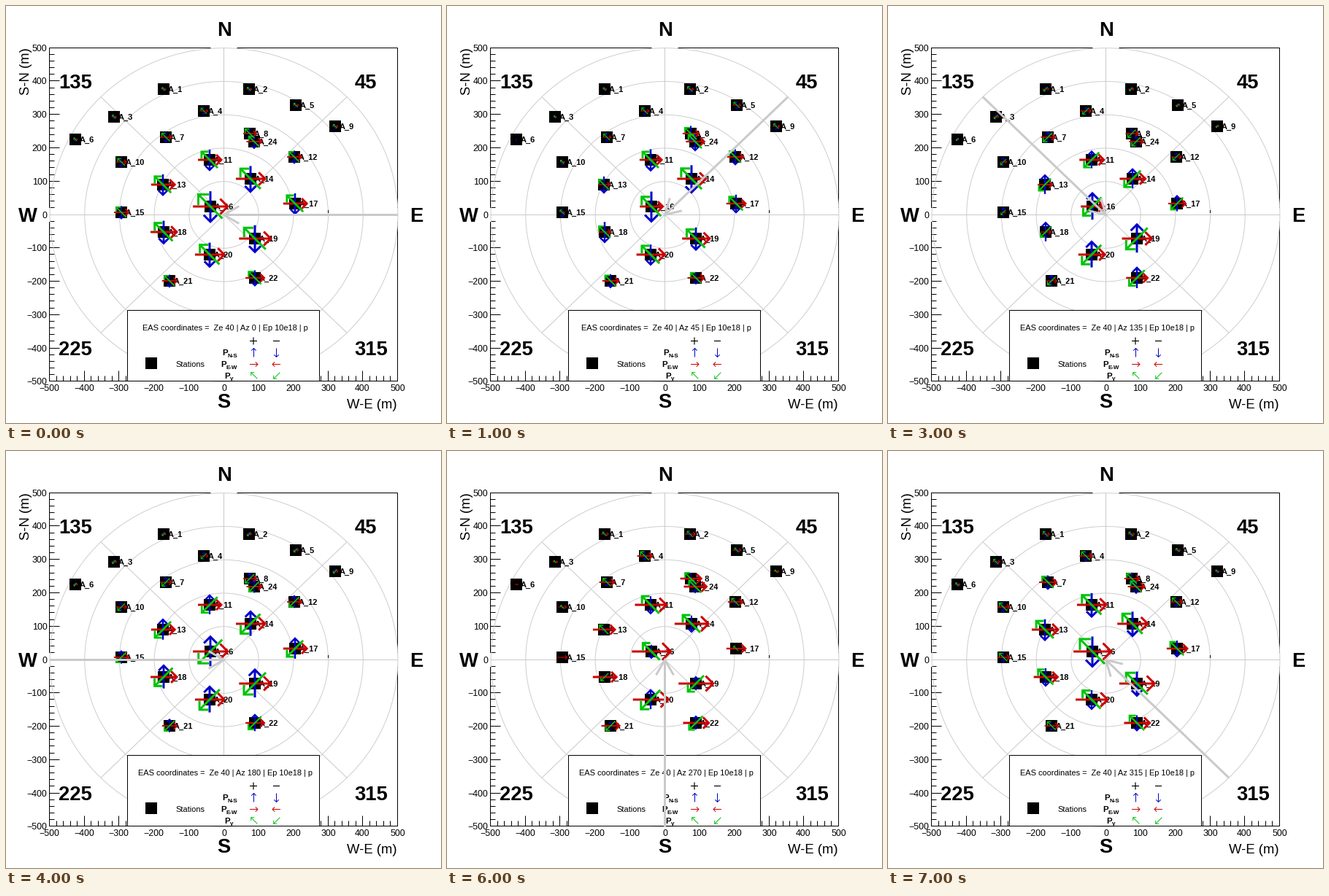
Recreate the animation shown at these times as a matplotlib script. Size 596x572 px, loop 8 s.

```python
import numpy as np
import matplotlib.pyplot as plt
from matplotlib.animation import FuncAnimation
from matplotlib.patches import Ellipse, Rectangle

W, H, DPI = 596, 572, 100
PX = 72 / DPI                      # points per pixel
LEFT, RIGHT, TOP, BOTTOM = 59.5, 536.5, 57.5, 514.5
CX, CY = 298.5, 286.5              # shower core
RX, RY = 238.4, 228.8              # 500 m in pixels
ZENITH = 40
GREY, RED, BLUE, GREEN = "#cacaca", "#cc0000", "#0000cc", "#00c40a"

plt.rcParams["font.family"] = "Liberation Sans"

STATIONS = {
    1: (216, 114), 2: (333, 114), 3: (148, 152), 4: (271, 144),
    5: (397, 136), 6: (95, 183), 7: (219, 180), 8: (334, 175),
    9: (451, 165), 10: (158, 214), 11: (279, 211), 12: (395, 207),
    13: (215, 245), 14: (335, 237), 15: (158, 283), 16: (280, 275),
    17: (396, 271), 18: (216, 310), 19: (341, 319), 20: (279, 341),
    21: (224, 377), 22: (341, 373), 24: (340, 186),
}

fig = plt.figure(figsize=(W / DPI, H / DPI), dpi=DPI, facecolor="white")
ax = fig.add_axes([0, 0, 1, 1])
ax.set_xlim(0, W)
ax.set_ylim(H, 0)
ax.axis("off")


def line(xs, ys, color="black", width=1.0, z=1):
    return ax.plot(xs, ys, color=color, lw=width * PX, zorder=z, snap=False,
                   solid_capstyle="butt", solid_joinstyle="miter")[0]


def text(x, y, s, size, ha="center", bold=False, z=5):
    """Place text with its capitals centred on y."""
    return ax.text(x, y + .36 * size, s, fontsize=size * PX, ha=ha,
                   va="baseline", zorder=z,
                   fontweight="bold" if bold else "normal")


def arrow(tail, tip, head, color, width, z, half_angle=45):
    """Open arrow: a shaft and two wings of the given length."""
    (x0, y0), (x1, y1) = tail, tip
    back = np.arctan2(y0 - y1, x0 - x1)
    a = back + np.radians([-half_angle, half_angle])
    wx, wy = x1 + head * np.cos(a), y1 + head * np.sin(a)
    return [line([x0, x1], [y0, y1], color, width, z),
            line([wx[0], x1, wx[1]], [wy[0], y1, wy[1]], color, width, z)]


def square(x, y, z):
    ax.add_patch(Rectangle((x - 8, y - 8), 16, 16, fc="black", ec="none",
                           zorder=z, snap=False))


def draw_axes():
    line([LEFT, RIGHT, RIGHT, LEFT, LEFT], [TOP, TOP, BOTTOM, BOTTOM, TOP])
    for m in range(-500, 501, 20):
        x = np.floor(298 + m * RX / 500) + .5
        y = np.floor(286 - m * RY / 500) + .5
        size = 14 if m % 100 == 0 else 7
        line([x, x], [BOTTOM, BOTTOM - size])
        line([LEFT, LEFT + size], [y, y])
        if m % 100 == 0:
            name = str(m).replace("-", "\u2212")
            text(x, 524, name, 12.4)
            text(56.5, y, name, 12.4, "right")
    text(536, 545, "W-E (m)", 18.5, "right")
    ax.text(32, 57, "S-N (m)", fontsize=18.5 * PX, rotation=90,
            rotation_mode="anchor", ha="right", va="baseline")


def draw_polar():
    # The outer ring hides the frame where the two touch
    line([CX - 18, CX + 18], [TOP, TOP], "white", 1.2, 2)
    for x in (LEFT, RIGHT):
        line([x, x], [CY - 9.5, CY + 9.5], "white", 1.2, 2)
    for k in range(1, 6):
        ax.add_patch(Ellipse((CX, CY), .4 * RX * k, .4 * RY * k, fill=False,
                             ec=GREY, lw=.9 * PX, zorder=2))
    for a in np.radians([0, 45, 90, 135]):
        dx, dy = RX * np.cos(a), RY * np.sin(a)
        line([CX - dx, CX + dx], [CY + dy, CY - dy], GREY, 1, 2)
    line([441.5, 441.5], [280, 284], z=2)
    for x, y, s in ((299, 31, "N"), (298, 541, "S"), (562, 286, "E"),
                    (30, 286, "W"), (95, 103, "135"), (493, 103, "45"),
                    (95, 469, "225"), (500, 469, "315")):
        text(x, y, s, 27.4, bold=True)


def draw_legend():
    ax.add_patch(Rectangle((166.5, 417.5), 263, 97, fc="white", ec="black",
                           lw=PX, zorder=4, snap=False))
    square(199, 490, 5)
    text(232, 491.5, "Stations", 11, "left")
    line([334, 344], [459.5, 459.5], width=1.2, z=5)
    line([339, 339], [454.5, 464.5], width=1.2, z=5)
    line([366, 375], [459.5, 459.5], width=1.2, z=5)
    for x, y, sub in ((296, 475, "N-S"), (294.5, 491, "E-W"),
                      (299, 506.5, "\u03b3")):
        text(x, y, "P", 11.5, "left", True)
        text(x + 7.5, y + 4, sub, 8, "left", True)
    for x, y, u, v, color in ((339.5, 475.5, 0, -6, BLUE),
                              (370.5, 475.5, 0, 6, BLUE),
                              (339.5, 491.5, 5.5, 0, RED),
                              (370.5, 491.5, -5.5, 0, RED),
                              (340, 507, -4.3, -4.3, GREEN),
                              (371, 507, -4.3, 4.3, GREEN)):
        arrow((x - u, y - v), (x + u, y + v), 4.5, color, 1, 5)


def field(x, y, az):
    """East and north half-lengths of the field arrows at a station."""
    dx, dy, a = x - CX, CY - y, np.radians(az)
    rho = np.hypot(dx, dy)
    along = (dx * np.cos(a) + dy * np.sin(a)) * np.sin(np.radians(ZENITH))
    dist = np.sqrt(rho ** 2 - along ** 2)        # to the shower axis
    size = 24 / (1 + (dist / 97) ** 3)
    # The common direction fades for showers from the north,
    # which leaves the part that depends on the bearing from the core
    gain = 1 - .12 * np.sin(a)
    east = gain * np.tanh(3 * (dx / rho + 2.5 - 1.9 * np.sin(a)))
    north = -.88 * np.tanh(.9 * dy / rho + 2.5 * np.cos(a))
    return size * east, size * north


def field_arrow(x, y, u, v, color, z):
    size = np.hypot(u, v)
    if size < 1.5:
        return []
    return arrow((x - u, y + v), (x + u, y - v), .62 * size, color,
                 np.clip(size / 5.5, 1, 3), z)


draw_axes()
draw_polar()
draw_legend()
for n, (x, y) in STATIONS.items():
    square(x, y, 5)
    text(x + 6, y, f"A_{n}", 11, "left", True, z=6)
header = text(300.5, 441, "", 11)
moving = []


def update(i):
    az = 45 * i
    while moving:
        moving.pop().remove()
    header.set_text(f"EAS coordinates =  Ze {ZENITH} | Az {az} | Ep 10e18 | p")
    for x, y in STATIONS.values():
        east, north = field(x, y, az)
        diag = .74 * np.sqrt(abs(east * north))
        moving.extend(field_arrow(x, y, 0, north, BLUE, 7))
        moving.extend(field_arrow(x, y, east, 0, RED, 8))
        moving.extend(field_arrow(x, y, -diag, -diag if north > 0 else diag,
                                  GREEN, 9))
    a = np.radians(az)
    start = CX + RX * np.cos(a), CY - RY * np.sin(a)
    moving.extend(arrow(start, (CX, CY), 24, GREY, 3, 10, 30))
    return moving + [header]


anim = FuncAnimation(fig, update, frames=8, interval=1000, repeat=True)
plt.show()
```
